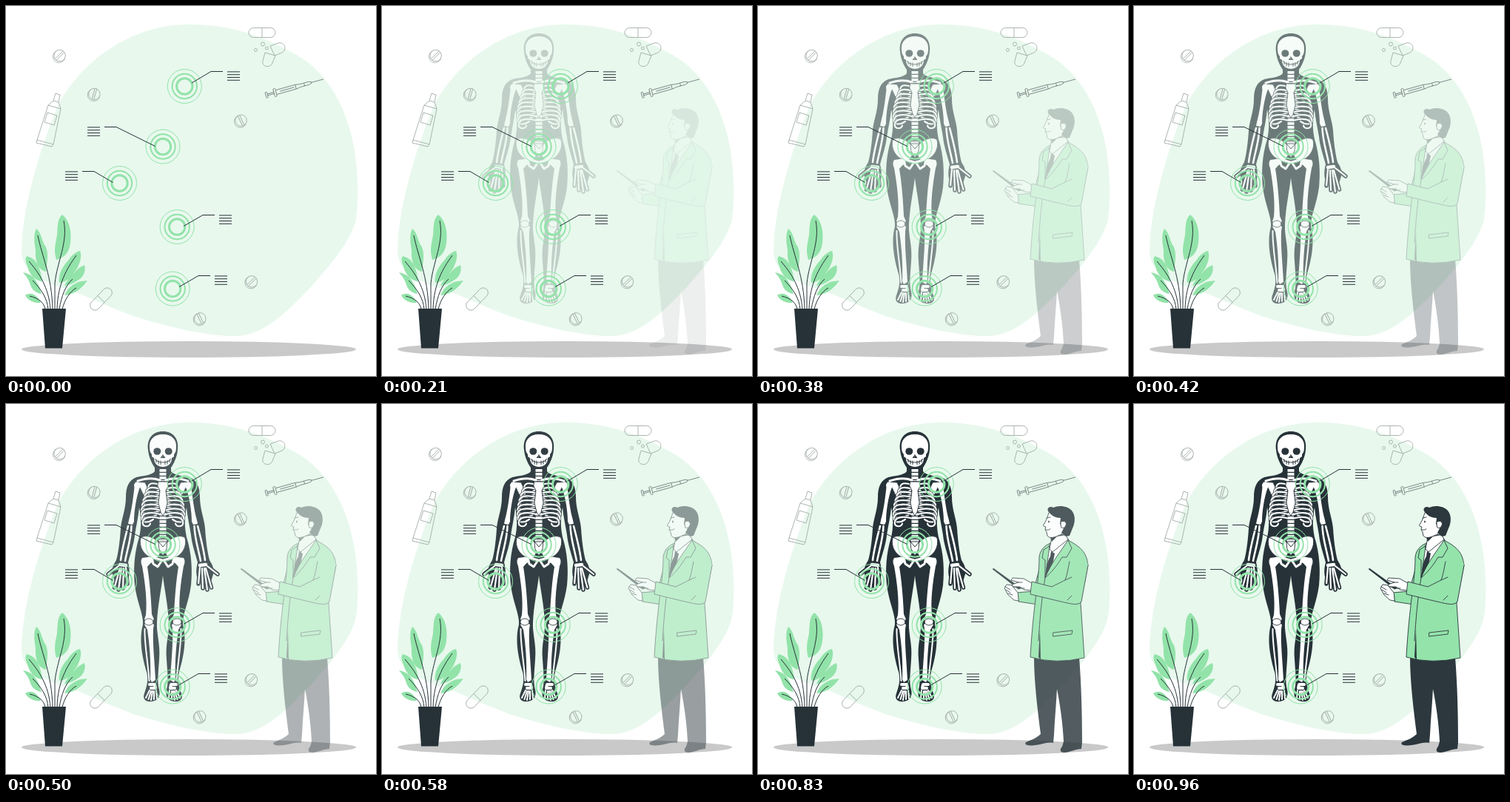
Animation of 500 by 500 pixels, one loop 1040 ms. Source, as an HTML page:

```html
<!DOCTYPE html>
<html lang="en">
<head>
<meta charset="utf-8">
<title>Anatomy check-up</title>
<style>
html, body { margin: 0; width: 100%; height: 100%; overflow: hidden; background: #fff }
svg { display: block; width: 100vw; height: 100vh }
.dark { fill: #263238 }
.green { fill: #92e3a9 }
.white { fill: #fff }
.line { fill: none; stroke: #263238; stroke-width: 1 }
.thin { fill: none; stroke: #a3acaa; stroke-width: .9; stroke-linejoin: round }
.bone { fill: none; stroke: #fff; stroke-linecap: round; stroke-linejoin: round }
.ink { stroke: #263238; stroke-width: .9; stroke-linejoin: round; stroke-linecap: round }
</style>
</head>
<body>
<svg viewBox="0 0 500 500">
  <defs>
    <path id="fingers" fill="none" stroke-linecap="round" d="M152 219L138 230M154 222L146.500 248M156 222L152 251M159 222L158 249M162 221L164 243"/>
    <g id="flesh">
      <path class="dark" d="M212.500 37H212C198 37 190 47 192 62C193 72 197 80 201 86V91C198 96 185 97 176 99C166 103 162 112 162 126C162 142 156 155 155 168C154 184 152 200 149 211C146 216 142 222 144 230L147 240H164C168 230 167 222 165 214C169 200 173 188 174 177C176 164 179 152 180 140C183 152 183 166 180 180C173 202 172 225 174 245C177 268 186 285 185 298C179 320 185 345 190 362C193 374 190 382 187 391C184 399 189 403 197 402C206 401 209 394 207 386C204 376 206 362 207 345C209 325 203 310 204 295C205 272 210 250 212 232H212.500Z"/>
      <use href="#fingers" stroke="#263238" stroke-width="5.500"/>
    </g>
    <g id="bones">
      <path class="white" d="M212.500 41H212C200 41 193 48 194 59C194 63 195 66 197 68L197 71L200 73C200 78 202 81 205 83Q208 85 212.500 85Z"/>
      <ellipse class="dark" cx="204.300" cy="64" rx="5" ry="4.800"/>
      <path class="dark" d="M212.500 67.500L208.500 73H212.500Z"/>
      <path class="line" stroke-width=".8" d="M201 74Q204 79 212.500 79M203 74.500V79M206 76V81.500M209 76.500V82"/>
      <path class="white ink" d="M174 105L188 106L195 121L189 129Q184 120 181 113Z"/>
      <g id="ribs"></g>
      <path class="bone" stroke-width="3" d="M208 103Q195 98 178 104"/>
      <!-- arm -->
      <circle class="white" cx="177.500" cy="110" r="4.500"/>
      <path class="white" d="M174 108L181 112C176 126 173 145 173 159L171 163L165 162L166 157C170 143 172 126 174 108Z"/>
      <path class="bone" stroke-width="2.600" d="M169.500 165C169 182 164 196 161 212M165 165C161 180 157 195 155 211"/>
      <path class="bone" stroke-width="4.500" d="M154 217L162 218"/>
      <use href="#fingers" stroke="#fff" stroke-width="2.200" stroke-dasharray="10 1.200"/>
      <!-- hip -->
      <path class="white ink" d="M207 188C200 179 187 176 182 181C179 192 186 204 195 207L205 208L208 202Z"/>
      <path class="bone" stroke-width="3" d="M197 207L211 211L205 220L199 216Z"/>
      <!-- leg -->
      <circle class="white" cx="193.500" cy="211" r="4.500"/>
      <path class="white" d="M192 207L184 208Q181 213 184 219C188 242 191 266 189 285L187 291Q193 296 200 291L197 284C196 262 194 238 191 220L197 213Z"/>
      <path class="white" d="M187 298Q193 294 200 298L199 304C198 325 201 350 202 373L197 376L195 372C196 348 194 325 191 305Z"/>
      <ellipse class="white ink" cx="193" cy="294.500" rx="6" ry="4.500"/>
      <path class="bone" stroke-width="2" d="M187.500 304C187 325 192 350 193.500 374"/>
      <path class="bone" stroke-width="4" d="M194 379L201 379L202 384L196 384"/>
      <path class="bone" stroke-width="2" stroke-dasharray="8 1.300" d="M194 387L189 397M196 388L192.500 399M198 388L196 400M200 388L200 399M203 387L204 398"/>
    </g>
  </defs>

  <path fill="#e8f8ed" d="M245 25C300 24 345 40 385 62C434 86 460 136 470 190C476 220 477 265 473 288C468 315 435 355 405 387C370 423 345 443 315 446C270 447 215 432 175 420C150 411 125 400 100 389C60 375 20 365 21 330C22 270 47 190 70 135C99 79 164 26 245 25Z"/>
  <ellipse cx="247" cy="464" rx="226" ry="11" fill="#c9c9c9"/>

  <!-- medicine -->
  <g class="thin">
    <path d="M67 118L73 120L71 130L64 128ZM64 128L57 134L42 181L64 187L74 139L71 130M57 134L74 139M42 181L41 185L62 190L64 187M56 144L69 148L65 161L52 157Z"/>
    <rect x="328" y="29.500" width="36" height="13" rx="6.500"/><path d="M346 29.500V42.500"/>
    <g transform="translate(128.500 396) rotate(-46)"><rect x="-18.500" y="-6.500" width="37" height="13" rx="6.500"/><path d="M0-6.500V6.500"/></g>
    <path d="M357 54L363 67L373 63C380 59 377 48 368 50ZM350 63L364 67L360 77C357 85 345 82 347 74Z"/>
    <circle cx="347" cy="51.500" r="2.500"/><circle cx="352.500" cy="57" r="2"/><circle cx="337.500" cy="59.500" r="2"/>
    <g transform="translate(351 120.500) rotate(-15.500)" stroke="#7c8785">
      <rect x="0" y="-4" width="2.500" height="8" rx="1"/>
      <path d="M2.500-1H12M2.500 1H12M15-3H42L48-2H60L64-1V1L60 2H48L42 3H15M42-3V3M54-2V2M20 0H40M64 0H81"/>
      <rect x="11.500" y="-5.500" width="3" height="11" rx="1"/>
    </g>
    <g id="pills"></g>
  </g>

  <!-- plant -->
  <path class="green" d="M76 282C86 290 89 305 87 320C85 335 78 340 68 343C64 330 67 320 69 310C70 298 69 288 76 282ZM41 301C48 306 48 318 54 326C58 336 55 350 54 359C44 357 39 345 40 330C38 318 37 308 41 301ZM28 338C40 341 46 350 49 372C40 372 31 362 29 352C27 347 25 342 28 338ZM23 360C33 362 38 366 42 374C46 380 46 384 48 389C40 388 35 383 33 377C31 370 28 366 23 360ZM26 391C34 386 42 390 47 401C38 402 30 398 26 391ZM100 331C103 338 100 346 97 353C90 364 82 374 72 374C70 362 78 350 84 344C89 336 95 332 100 331ZM106 350C109 360 102 368 98 370C92 374 85 378 79 378C82 371 88 364 92 361C96 355 102 352 106 350ZM110 371C104 379 96 389 79 391C83 381 90 376 98 373C103 371 107 372 110 371Z"/>
  <path class="line" d="M78 290C84 320 69 345 66 375L66 410M43 310C49 340 62 365 63 410M31 345C44 360 58 380 60 410M36 371C47 382 56 395 57 410M32 392C45 395 52 402 53 410M95 337C82 355 70 375 69 410M90 369C80 378 75 392 72 410M95 381C86 386 79 397 76 410"/>
  <path class="dark" d="M49 409H81L76 462.500H53Z"/>

  <g id="body" opacity="0">
    <use href="#flesh"/><use href="#flesh" transform="translate(424) scale(-1 1)"/>
    <path stroke="#fff" fill="none" stroke-width="9" stroke-dasharray="3.800 1.200" d="M212 88V104M212 147V184"/>
    <use href="#bones"/><use href="#bones" transform="translate(424) scale(-1 1)"/>
    <path class="white ink" d="M206 105H218L219 111L216 117L218 134L215 146L212 151L209 146L206 134L208 117L205 111Z"/>
    <path class="white ink" d="M206 183H218L217 196L212 205L207 196Z"/>
    <path class="line" stroke-width=".8" d="M206 186H218L212 193Z"/>
  </g>

  <g id="marks"></g>

  <g id="doctor" opacity="0">
    <path class="dark" d="M373 342C373 375 378 415 382 446C376 452 369 454 362 457Q359 461 368 461.500C380 462 390 456 399 458L400 447C401 425 403 405 404 385C408 405 412 432 413 456Q412 462 409 466Q407 471 415 471C423 470 430 466 437 466L438 457C438 420 437 380 434 342Z"/>
    <!-- far arm and tablet -->
    <path class="green ink" d="M381 220L372 253L350 255L352 267L378 271Z"/>
    <path class="ink white" d="M351 255L343 245L336 244L333 249L338 258L346 265L352 266Z"/>
    <path class="dark" d="M316.500 223L318.500 222L356 249L352 250.500Z"/>
    <path class="ink" fill="none" d="M334 247L341 251M335 251L341 255M338 256L344 258"/>
    <!-- coat -->
    <path class="green ink" d="M398 187C388 190 381 197 380 207C380 240 372 270 368 342Q402 352 441 343L436 269L446 218C444 203 440 195 419 184Z"/>
    <path class="ink white" d="M399 181L391 196L388 234C396 218 410 204 420 184L414 176Z"/>
    <path class="dark" d="M396 199L401 202L400 207C399 216 394 225 389 232C389 222 391 212 395 206Z"/>
    <path class="ink white" d="M397 180L394 196L398 200L419 183L416 177Z"/>
    <path class="green ink" d="M394 192L386 197L384 208L388 211L388 235C390 220 392 208 394 192ZM419 184L424 195L417 207L411 207C403 220 396 228 388 235C396 215 409 199 419 184Z"/>
    <path class="ink" fill="none" d="M388 235C383 265 381 290 379 320M399 309L425 306L424 311L399 314Z"/>
    <path class="dark" d="M381 304L379 342L382 346Z"/>
    <!-- near arm -->
    <path class="ink white" d="M370 242L359 236L344 235L342 238L352 241L343 244L345 247L354 247L360 251L370 252Z"/>
    <path class="ink" fill="none" d="M352 241L357 241M346 247L354 249L360 249"/>
    <path class="green" d="M420 214L415 238L397 247L370 240L368 257L405 266L430 271L437 267L446 218C444 208 438 202 430 204Z"/>
    <path class="ink" fill="none" d="M421 213C419 222 418 231 415 238L397 247L370 240L368 257L405 266C420 269 432 274 437 267L446 218M415 238L424 234M418 265L424 259"/>
    <!-- head -->
    <path class="ink white" d="M393 147C391 153 390 157 385.500 164Q386 166 389 166L388 170L390 173L391 178Q394 182 401 180L410 176L418 168L415 150Z"/>
    <path class="dark" d="M395 180.500L404 179L397 186Z"/>
    <path class="dark" d="M394 147C388 142 394 137 399 140C407 136 419 138 424 144C430 151 428 162 425 168L421 178L416 179L410 174L413 168L408 162L409 154C402 154 397 151 394 147Z"/>
    <path class="ink white" d="M409 160C413 156 418 160 416 164Q414 169 410 167Z"/>
    <path class="ink" fill="none" d="M390 154L395 153M389 170Q393 171 395 169"/>
    <ellipse class="dark" cx="393" cy="159" rx=".9" ry="1.500"/>
  </g>
</svg>
<script>
const $ = id => document.getElementById(id);
const fill = (id, list, draw) => $(id).innerHTML = list.map(draw).join('');

fill('pills', [[72.6, 67, -45], [119.4, 119, -75], [317.6, 154.7, 65], [332, 372.3, -45], [262.3, 422.3, 65]], ([x, y, a]) =>
  `<g transform="translate(${x} ${y})"><circle r="7.700"/><path d="M-4-6.500A8.300 8.300 0 1 0 7 4"/>
   <path transform="rotate(${a})" d="M-7.500-1.300H7.500M-7.500 1.300H7.500"/></g>`);

fill('ribs', [...Array(9).keys()], i => {
  const y = 109 + i * 5.7, x = 192 - 9 * Math.sin(i / 8 * 2.2), end = i < 6 ? 207 : 203 - (i - 6) * 4;
  const d = `M208 ${y}C198 ${y - 3} ${x} ${y - 3} ${x} ${y + 6}C${x} ${y + 12} ${x + 9} ${y + 12} ${end} ${y + 7}`;
  return `<path class="line" style="stroke-width:3.600" d="${d}"/><path class="bone" stroke-width="2.100" d="${d}"/>`;
});

// ring centre, line start, side of the note, note elbow
fill('marks', [
  [241.3, 108.5, 251, 104, 1, 277, 88.5],
  [212, 190, 201.5, 189.5, -1, 149, 163.5],
  [153.5, 239.5, 144.5, 238.5, -1, 119, 223.5],
  [231.2, 298.5, 240, 297.5, 1, 266, 282.5],
  [225.2, 382, 234, 379.5, 1, 260, 364.5]
], ([x, y, sx, sy, side, ex, ey]) => {
  const ring = (r, w) => `<circle cx="${x}" cy="${y}" r="${r}" fill="none" stroke="#92e3a9" stroke-width="${w}"/>`;
  const bars = [0, 1, 2, 3].map(i => `M${ex + side * 22} ${ey + .4 + i * 3.8}h${side * 17}`).join('');
  return ring(23, 1) + ring(16.7, 2) + ring(10.7, 3) +
    `<path class="line" d="M${sx} ${sy}L${ex} ${ey}h${side * 16}${bars}"/>`;
});

const LOOP = 1040, STEP = 1000 / 24;
function draw(now) {
  const t = now % LOOP;
  const n = t < 130 ? 0 : Math.floor((t - 120) / STEP) + 1;
  const p = Math.min(1, n / 13), q = Math.min(1, n / 21);
  $('body').setAttribute('opacity', p - .03 * Math.sin(2 * Math.PI * p));
  $('doctor').setAttribute('opacity', .97 * q ** 1.3);
  requestAnimationFrame(draw);
}
draw(performance.now());
</script>
</body>
</html>
```
